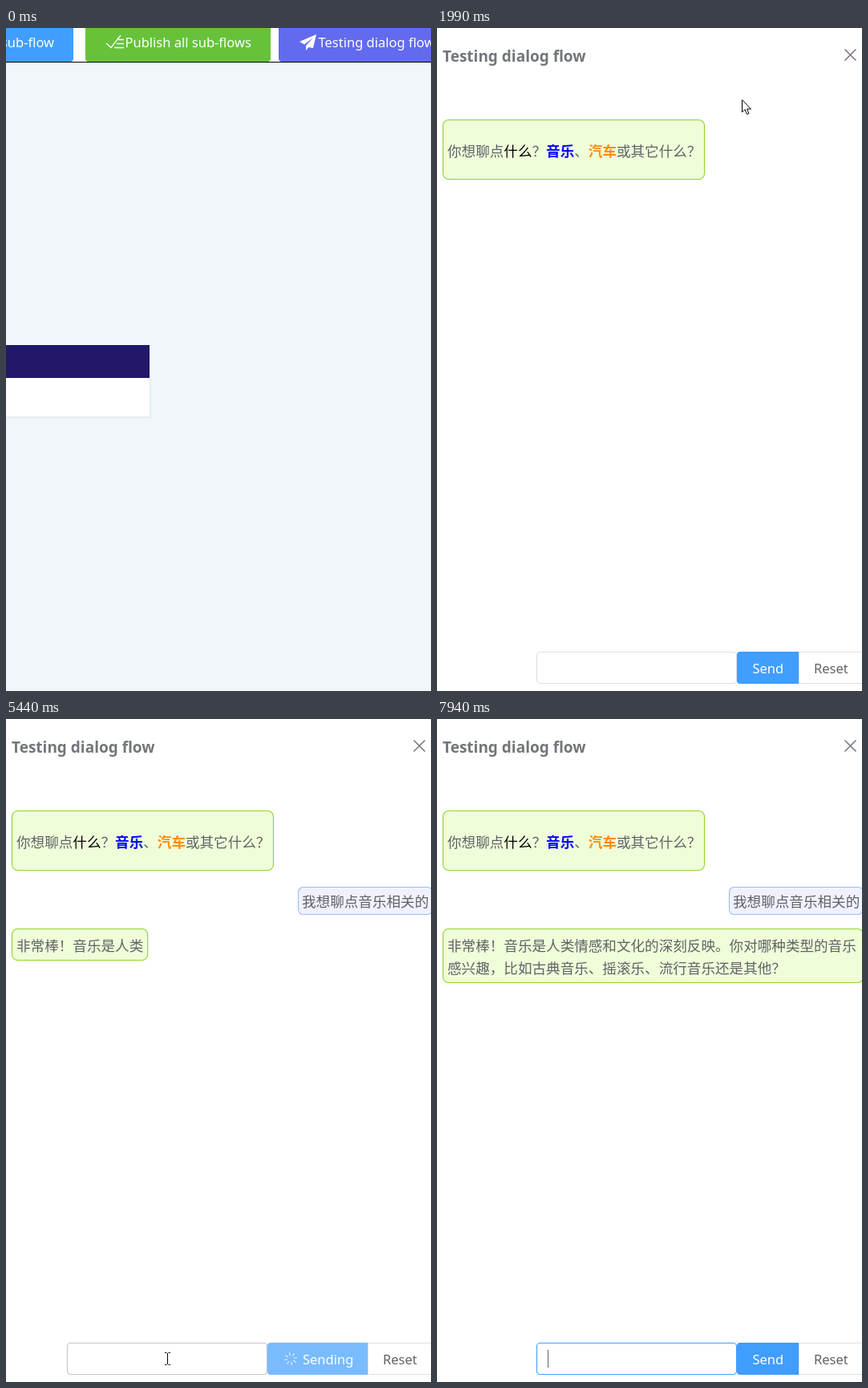
An HTML page with a canvas that plays this animation: 530x826 px, repeating every 8 s.

```html
<!DOCTYPE html>
<html lang="zh-CN">
<head>
<meta charset="utf-8">
<title>Testing dialog flow</title>
<style>
html, body { margin: 0; width: 100%; height: 100%; overflow: hidden; background: #fff; }
canvas { display: block; }
</style>
</head>
<body>
<canvas id="stage" width="530" height="826"></canvas>
<script>
const ctx = document.getElementById('stage').getContext('2d');
const LOOP = 8000;
const UI = '16.5px "Noto Sans", sans-serif';
const TITLE = 'bold 19px "Noto Sans", sans-serif';
const CHAR = 17.58;
const ZH = CHAR + 'px "Noto Sans CJK SC", "Noto Sans CJK", sans-serif';
const GRAY = '#606266', BLUE = '#409eff', LIGHT_BLUE = '#79bbff', LINE = '#dcdfe6';
const GREEN_FILL = '#effdd9', GREEN_LINE = '#8fd42c';

const REPLY = '非常棒！音乐是人类情感和文化的深刻反映。你对哪种类型的音乐感兴趣，比如古典音乐、摇滚乐、流行音乐还是其他？';
const PER_LINE = 29;
const SLIDE = 1537, FIRST_FOCUS = 2940, PASTE = 3470, SEND = 4480;
const REPLY_START = 5005, REPLY_RATE = 0.0211, SECOND_FOCUS = 5820, DONE = 7600;
const CLICKS = [1110, 2910, 4390, 5800];

// time, x, y of the pointer
const PATH = [
  [300, 481, 728], [560, 474, 480], [800, 458, 190], [1030, 445, 52], [1100, 461, 40],
  [1920, 461, 40], [1980, 380, 89], [2050, 380, 89], [2280, 240, 560], [2500, 167, 790],
  [2690, 223, 800], [3650, 223, 800], [3800, 300, 797], [4070, 433, 790], [4620, 433, 790],
  [5100, 201, 797], [7300, 201, 797], [7660, 36.5, 744], [7740, 36.5, 744]
];

function pointerAt(t) {
  const i = PATH.findIndex(k => k[0] > t);
  if (i < 1) return null;
  const [t0, x0, y0] = PATH[i - 1], [t1, x1, y1] = PATH[i];
  const u = (t - t0) / (t1 - t0);
  return { x: x0 + (x1 - x0) * u, y: y0 + (y1 - y0) * u };
}

function text(str, x, y, font, color, align = 'left') {
  ctx.font = font;
  ctx.fillStyle = color;
  ctx.textAlign = align;
  ctx.fillText(str, x, y);
}

function box(x, y, w, h, radius, fill, line) {
  ctx.beginPath();
  if (line) ctx.roundRect(x + 0.5, y + 0.5, w - 1, h - 1, radius);
  else ctx.roundRect(x, y, w, h, radius);
  ctx.fillStyle = fill;
  ctx.fill();
  if (line) {
    ctx.strokeStyle = line;
    ctx.lineWidth = 1.1;
    ctx.stroke();
  }
}

function strokePath(d, color, width) {
  ctx.strokeStyle = color;
  ctx.lineWidth = width;
  ctx.stroke(new Path2D(d));
}

function shape(d, fill, line) {
  const path = new Path2D(d);
  ctx.fillStyle = fill;
  ctx.fill(path);
  if (line) {
    ctx.strokeStyle = line;
    ctx.lineWidth = 1;
    ctx.stroke(path);
  }
}

// Only the shadow lands on the stage; the rectangle itself stays outside
function castShadow(left, blur, spread, alpha) {
  ctx.save();
  ctx.shadowColor = `rgba(0,0,0,${alpha})`;
  ctx.shadowBlur = blur;
  ctx.shadowOffsetX = 2000;
  ctx.fillRect(left - spread - 2000, -200, 800, 1226);
  ctx.restore();
}

function drawPage(hover) {
  ctx.fillStyle = '#f0f6f9';
  ctx.fillRect(0, 0, 530, 826);
  ctx.fillStyle = '#fff';
  ctx.fillRect(0, 0, 530, 42);
  ctx.fillStyle = '#000';
  ctx.fillRect(0, 42, 530, 1);
  box(-40, -10, 124, 52, 4, BLUE);
  box(99, -10, 231, 52, 4, '#67c23a');
  box(340, -10, 230, 52, 4, hover ? '#888ef2' : '#626aef');
  text('sub-flow', 60, 24, UI, '#fff', 'right');
  text('Publish all sub-flows', 148.5, 24, UI, '#fff');
  text('Testing dialog flow', 389.5, 24, UI, '#fff');
  strokePath('M125 19L131 24.5L143 9M140 14.5H147M138 19.5H147M135 24.5H147', '#fff', 1.3);
  shape('M387 8L366 17L372 20.5L383 12L374 22V28L377.5 24L383 25Z', '#fff');
  ctx.fillStyle = '#e7ecef';
  ctx.fillRect(0, 436, 181, 50);
  ctx.fillStyle = '#fff';
  ctx.fillRect(0, 436, 179, 48);
  ctx.fillStyle = '#21186a';
  ctx.fillRect(0, 395, 179, 41);
}

function drawGreeting() {
  box(7, 114, 327, 75, 7, GREEN_FILL, GREEN_LINE);
  let x = 13;
  for (const [str, color, bold] of [
    ['你想聊点', GRAY], ['什么', '#000'], ['？', GRAY], ['音乐', '#00f', true],
    ['、', GRAY], ['汽车', '#ff8c00', true], ['或其它什么？', GRAY]
  ]) {
    text(str, x, 159.5, (bold ? 'bold ' : '') + ZH, color);
    x += str.length * CHAR;
  }
}

function drawReply(t) {
  const shown = REPLY.slice(0, Math.max(0, Math.floor((t - REPLY_START) * REPLY_RATE)));
  if (!shown) return;
  const wraps = shown.length > PER_LINE;
  const width = shown.length >= PER_LINE ? 525 : 12 + shown.length * CHAR;
  box(7, 261, width, wraps ? 68 : 40, 7, GREEN_FILL, GREEN_LINE);
  text(shown.slice(0, PER_LINE), 13, 289, ZH, GRAY);
  text(shown.slice(PER_LINE), 13, 317, ZH, GRAY);
}

function drawSpinner(t) {
  ctx.save();
  ctx.translate(355, 797);
  ctx.rotate(t / 2000 * 2 * Math.PI);
  for (let i = 0; i < 8; i++) {
    strokePath('M0 -4V-8', '#e4f1ff', 1.2);
    ctx.rotate(Math.PI / 4);
  }
  ctx.restore();
}

function drawInputRow(t, pointer) {
  const sending = t >= SEND && t < DONE;
  const left = sending ? 76 : 124, edge = left + 250;
  const focus = (t >= FIRST_FOCUS && t < SEND) ? FIRST_FOCUS : t >= SECOND_FOCUS ? SECOND_FOCUS : 0;
  const inRow = pointer && t > 1920 && pointer.y > 777;
  const hovered = inRow && pointer.x > left && pointer.x < edge;
  const sendHovered = inRow && pointer.x >= edge && pointer.x < 451;

  box(451, 777, 100, 40, 0, '#fff', LINE);
  text('Reset', 470, 803.5, UI, GRAY);
  box(edge, 777, 451 - edge, 40, [4, 0, 0, 4], sending || sendHovered ? LIGHT_BLUE : BLUE);
  text(sending ? 'Sending' : 'Send', sending ? 370 : 393.5, 803.5, UI, '#fff');
  if (sending) drawSpinner(t);
  box(left, 777, 250, 40, 4, '#fff', focus ? BLUE : hovered ? '#c0c4cc' : LINE);

  if (t >= PASTE && t < SEND) text('我想聊点音乐相关的', 137.5, 804, ZH, GRAY);
  else if (focus && (t - focus) % 1060 < 530) {
    ctx.fillStyle = GRAY;
    ctx.fillRect(left + 14, 786, 1, 22);
  }
}

function drawDrawer(t, pointer) {
  if (t <= SLIDE) return;
  const u = Math.min(1, (t - SLIDE) / 300);
  const p = 1 - (1 - u) ** 2.4;
  ctx.fillStyle = `rgba(0,0,0,${0.5 * p})`;
  ctx.fillRect(0, 0, 530, 826);
  const shift = Math.round(548 * (1 - p));
  castShadow(shift - 18, 48, 16, 0.08);
  castShadow(shift - 18, 32, 0, 0.12);
  castShadow(shift - 18, 16, -8, 0.16);
  ctx.save();
  ctx.translate(shift, 0);
  ctx.fillStyle = '#fff';
  ctx.fillRect(-18, 0, 800, 826);
  text('Testing dialog flow', 7, 42, TITLE, '#72767b');
  strokePath('M508.5 26.5L522.5 40.5M522.5 26.5L508.5 40.5', '#72767b', 1.5);
  drawGreeting();
  if (t >= SEND) {
    box(364, 209, 168, 35, 6, '#eff2fd', '#9fbcf3');
    text('我想聊点音乐相关的', 369, 234, ZH, GRAY);
  }
  drawReply(t);
  drawInputRow(t, pointer);
  ctx.restore();
}

function drawPointer(t, { x, y }) {
  const click = CLICKS.find(c => t >= c && t < c + 200);
  if (click) {
    ctx.fillStyle = `rgba(255,235,0,${0.6 * (1 - ((t - click) / 200) ** 2)})`;
    ctx.beginPath();
    ctx.arc(x, y, 15, 0, 2 * Math.PI);
    ctx.fill();
  }
  ctx.save();
  ctx.translate(Math.round(x), Math.round(y));
  const overText = t > 7300 || (t > 1920 && y > 777 && x < (t >= SEND ? 326 : 374));
  const overButton = t < SLIDE ? y < 42 : y > 777;
  if (overText) {
    strokePath('M-3 -7.5H-0.5M1.5 -7.5H4M-3 7.5H-0.5M1.5 7.5H4M0.5 -7V7', '#000', 1);
  } else if (overButton) {
    shape('M-1.5 1Q0.5 -2 2.5 1V8Q4.5 6 6 8.5Q8 7 9 9.5Q11 8 11.5 11V16Q11 19 9 22H1Q-1 18 -4.5 14.5Q-5.5 11.5 -1.5 13Z', '#fff', '#000');
    strokePath('M2.5 8V12M6 8.5V12M9 9.5V12.5', '#000', 1);
  } else {
    shape('M0.5 0.5V16L4 12.5L6.5 18.5L9 17.5L6.5 12H11.5Z', '#fff', '#000');
  }
  ctx.restore();
}

function draw(now) {
  const t = now % LOOP;
  const pointer = pointerAt(t);
  drawPage(pointer && t < SLIDE && pointer.y < 42);
  drawDrawer(t, pointer);
  if (pointer) drawPointer(t, pointer);
  requestAnimationFrame(draw);
}
requestAnimationFrame(draw);
</script>
</body>
</html>
```
